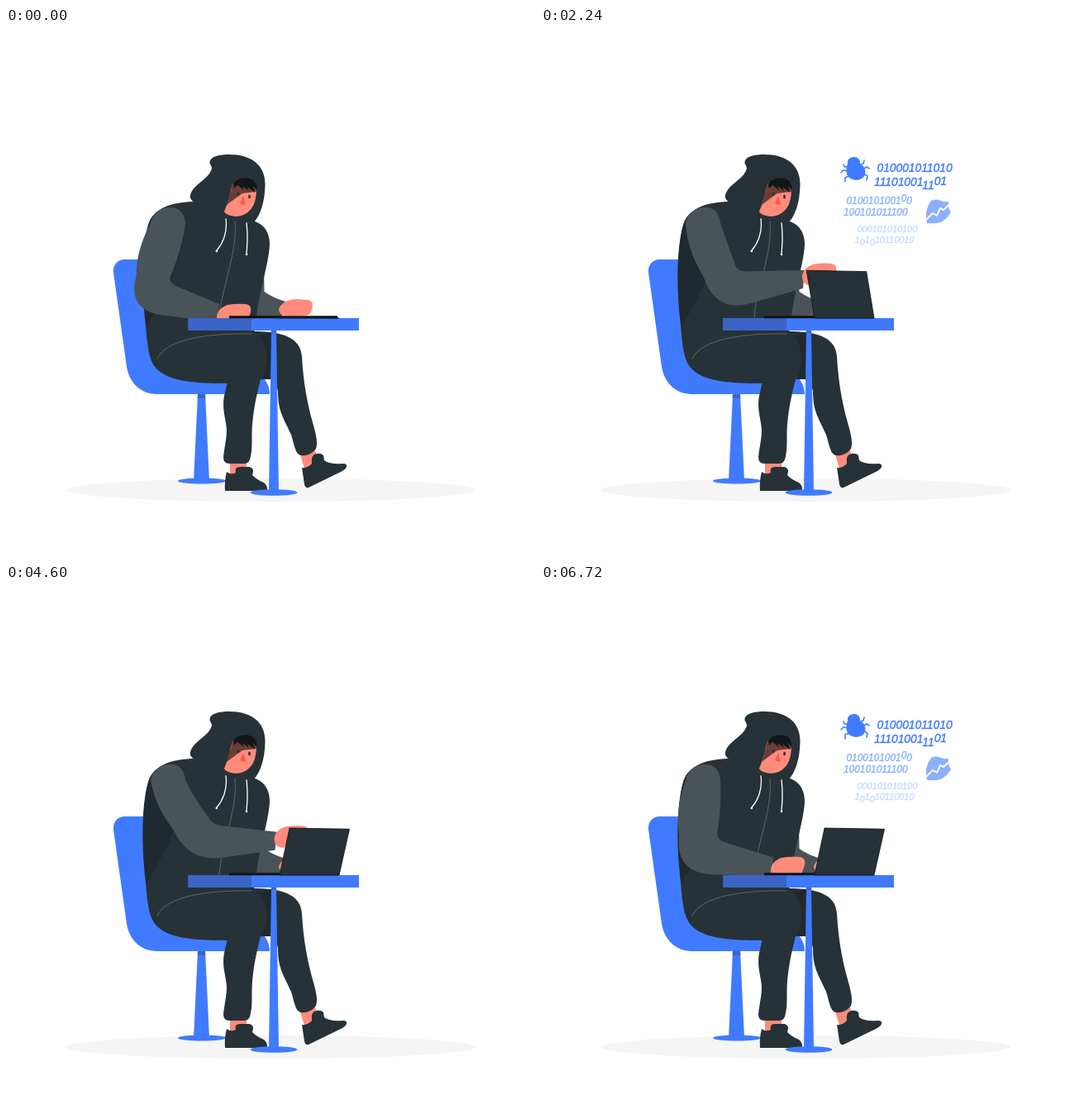
These frames come from a looping animation (640x640 px, 8000 ms). An HTML page:

```html
<!DOCTYPE html>
<html lang="en">
<head>
<meta charset="utf-8">
<title>Hooded figure at a laptop</title>
<style>
  html, body { margin: 0; width: 100%; height: 100%; overflow: hidden; background: #fff; }
  svg { display: block; width: 100%; height: 100%; }
  .dark { fill: #263238; }
  .shade { fill: #1f292f; }
  .sleeve { fill: #4a5357; }
  .blue { fill: #407bff; }
  .deep { fill: #3b64c6; }
  .skin { fill: #ff8b7b; }
  .line { fill: none; stroke-linecap: round; stroke-linejoin: round; }
  #code text { font: italic 13.8px "Liberation Sans", Arial, sans-serif; stroke: #407bff; stroke-width: .4; }
  #code .mid text { font-size: 11.9px; }
  #code .far text { font-size: 10.9px; }
  .mid { opacity: .6; }
  .far { opacity: .28; }
</style>
</head>
<body>
<svg viewBox="0 0 640 640">
  <ellipse cx="320" cy="559" rx="248" ry="14" fill="#f5f5f5"/>

  <g id="chair" class="blue">
    <path d="M144 280H175L190 400H298C310 424 319 428 319 443H183C162 443 149 428 146 410L130 296C129 287 135 280 144 280Z"/>
    <path d="M232 443H241L246 548H227Z"/>
    <path class="deep" d="M232 443H241L241.3 448H231.700Z"/>
    <ellipse cx="237" cy="548" rx="29" ry="3.600"/>
  </g>

  <g id="rearArm">
    <path class="sleeve" d="M312 288L312.500 319Q322 326 338 331L334 350H298Z"/>
    <path class="skin" d="M330 340C334 330 345 328 352 328L366 329C373 331 371 339 369 344Q367 348 360 348H338Q330 347 330 340Z"/>
  </g>

  <g id="legs">
    <path class="skin" d="M356 516L374 511L377 523L361 533ZM271 524H291V541H271Z"/>
    <path class="dark" d="M290 367C330 366 357 372 358 398C360 430 364 450 369 470C374 488 378 500 375 509C370 516 362 518 357 517C350 516 349 505 345 492C336 472 329 464 329 440L326 425H300Z"/>
    <path class="shade" d="M304 373C318 385 317 405 310 425H321V368Z"/>
    <path class="dark" d="M358 532Q364 533 370 527Q369 518 373 516Q380 513 384 517L385 523Q390 528 408 527Q413 527 412 531Q411 534 405 537L366 556Q362 557 361 552Z"/>
    <path class="dark" d="M267 537Q272 541 278 538Q276 531 283 531H295Q301 533 298 541Q304 547 312 550Q316 553 316 558Q316 560 312 560H265Q264 548 267 537Z"/>
  </g>

  <g id="body">
    <path class="dark" d="M226 210C200 211 180 218 173 235C163 265 164 320 169 360C171 385 173 402 181 411C195 427 225 430 268 430L300 370L303 350C306 320 318 285 319 262C319 248 313 237 298 233Z"/>
    <path class="dark" d="M200 385C220 370 270 368 295 368C312 369 316 388 312 406C309 425 303 440 299 470C296 490 299 505 296 518Q295 527 288 527H270Q263 527 263 519C264 508 267 498 267 486C266 472 261 462 264 445L268 428Z"/>
    <path class="shade" d="M173 236C164 265 164 320 170 362L197 312C204 290 216 265 216 236Z"/>
    <path class="line" stroke="#5c676c" d="M183 400C194 376 245 369 297 370"/>
    <path class="line" stroke="#5c676c" d="M277 234C279 255 274 275 268 300C263 320 259 335 258 350"/>
  </g>

  <g id="head">
    <path class="dark" d="M247 160C250 154 262 153 270 153C297 153 314 166 313.500 190C313 211 308 226 300 235L262 232L240 218C230 213 221 208 223 202C227 188 245 184 249 170C249 166 245 165 247 160Z"/>
    <path class="skin" d="M274 189L301 188C304 195 303 205 300 213C296 222 288 228 277 228C270 227 265 225 264 222Q271 205 272 196Z"/>
    <path fill="#6d3c37" d="M274 188L302 190L303 198L286 200L279 205L267 214L272 198Z"/>
    <path fill="#111619" d="M275 189C279 180 296 179 301 186Q304 190 303 196L299 191L301 199L292 192L294 197L286 191L288 196L280 190L276 194Z"/>
    <path fill="#ef5f50" d="M287 203L290 213Q286 215 283 212Z"/>
    <ellipse class="dark" cx="294.500" cy="204" rx="1.400" ry="2.600"/>
    <ellipse class="dark" cx="281" cy="201" rx="1.200" ry="2.200"/>
    <path class="line" stroke="#fff" stroke-width="1.300" d="M266 231C268 246 263 260 255 269M291 236Q293 253 291 273"/>
    <path fill="#fff" d="M253.500 270a1.300 1.300 0 1 0 2.600 0a1.300 1.300 0 1 0-2.600 0M289.700 274a1.300 1.300 0 1 0 2.600 0a1.300 1.300 0 1 0-2.600 0"/>
  </g>

  <path id="sleeve" class="sleeve"/>
  <path id="hand" class="skin" d="M0 15C1 6 8 3 13 1Q24-1 35 0C41 1 42 5 41 10L37 21Q35 25 28 25L12 26Q0 27 0 15Z"/>

  <g id="table" class="blue">
    <path d="M321 366H327L330 560H318Z"/>
    <path class="deep" d="M320.800 366H327.200V369H320.800Z"/>
    <ellipse cx="324" cy="562" rx="28.500" ry="3.800"/>
    <path d="M220.500 351H427V366H220.500Z"/>
    <path class="deep" d="M220.500 351H297V366H220.500Z"/>
  </g>
  <path fill="#0d1214" d="M270 348.300H401V351.300H270Z"/>
  <path id="lid" class="dark" stroke="#0d1214" stroke-width=".8"/>

  <g id="code" class="blue">
    <g>
      <path d="M371 164Q370 157 378 156Q386 156 386 164Q393 168 392.500 176Q390 184 381 184Q370 183 369.500 174Q369 168 371 164Z"/>
      <path class="line" stroke="#407bff" stroke-width="1.600" d="M371 168L367 168L366 165M371 173L366 172L363 175M373 179L368 181V186M387 165L390 164L391 160M391 170L394 168L397 170M391 177L395 179L394 184"/>
      <text x="406.500" y="174">010001011010</text>
      <text x="403" y="191">11101001<tspan dy="4">11</tspan><tspan dy="-5">01</tspan></text>
    </g>
    <g class="mid">
      <text x="369.500" y="213">0100101001<tspan dy="-3">0</tspan><tspan dy="3">0</tspan></text>
      <text x="366" y="227">100101011100</text>
      <path d="M472 209Q478 206 484 209Q489 211 493 210Q492 218 496 223Q492 230 484 235Q476 237 467 236Q463 221 472 209Z"/>
      <path class="line" stroke="#fff" stroke-width="2" d="M467 231L474 224L479 227L483 218L487 220L495 213"/>
    </g>
    <g class="far">
      <text x="382.500" y="247">000101010100</text>
      <text x="379.500" y="260">1<tspan dy="3">0</tspan><tspan dy="-3">1</tspan><tspan dy="3">0</tspan><tspan dy="-3">10110010</tspan></text>
    </g>
  </g>
</svg>

<script>
const LOOP = 8000, END = 6720, BEAT = 1120;
const TICKS = [0, 120, 240, 340, 440, 560, 680, 820, 920, 1020];

// time, inner elbow x y, outer elbow x y, hand x y, lid top offset x y
const POSES = [
  [0,    196, 308, 146, 342, 255, 334, -36, -2],
  [680,  209, 308, 160, 347, 274, 321, -31, -24],
  [1560, 230, 300, 197, 350, 302, 290, -20, -50],
  [2920, 245, 290, 222, 337, 326, 282, 0, -61],
  [4040, 262, 284, 235, 328, 335, 279, 12, -57],
  [5160, 237, 299, 199, 345, 308, 309, 12, -57],
  [6720, 212, 308, 162, 349, 278, 329, 12, -57]
];
const CODE_ON = [[1900, 4260], [6220, LOOP]];

const el = id => document.getElementById(id);
const sleeve = el("sleeve"), hand = el("hand"), lid = el("lid"), code = el("code");

const secant = (i, c) => (POSES[i + 1][c] - POSES[i][c]) / (POSES[i + 1][0] - POSES[i][0]);

function tangent(i, c) {
  if (i === 0) return secant(0, c);
  if (i === POSES.length - 1) return 0;
  const a = secant(i - 1, c), b = secant(i, c);
  return a * b > 0 ? 2 * a * b / (a + b) : 0;
}

// Monotone cubic through the poses
function poseAt(t) {
  let i = 0;
  while (i < POSES.length - 2 && t >= POSES[i + 1][0]) i++;
  const p = POSES[i], q = POSES[i + 1], span = q[0] - p[0], u = (t - p[0]) / span;
  const s = u * u * (3 - 2 * u);
  return p.slice(1).map((v, k) => {
    const c = k + 1;
    return v + (q[c] - v) * s
      + span * u * (1 - u) * ((1 - u) * tangent(i, c) - u * tangent(i + 1, c));
  });
}

const mix = (a, b, k) => [a[0] + (b[0] - a[0]) * k, a[1] + (b[1] - a[1]) * k];

function sleevePath(inner, outer, hx, hy) {
  const top = [hx + 3, hy + Math.max(0, (334 - hy) / 6)];
  const bottom = [hx + 1, top[1] + 22];
  const left = [175, 236], bend = [218 + (inner[0] - 209) * 0.3, 264];
  const back = mix(outer, left, 0.4), mid = mix(back, left, 0.5);
  return `M198 217C210 217 216 224 217 236Q${bend} ${mix(inner, bend, 0.2)}` +
    `Q${inner} ${mix(inner, top, 0.15)}L${top}L${bottom}L${mix(outer, bottom, 0.4)}` +
    `Q${outer} ${back}Q${mid[0] - 9} ${mid[1] + 1} ${left}C178 224 187 217 198 217Z`;
}

function draw(t) {
  const [ix, iy, ox, oy, hx, hy, dx, dy] = poseAt(t);
  sleeve.setAttribute("d", sleevePath([ix, iy], [ox, oy], hx, hy));
  hand.setAttribute("transform", `translate(${hx} ${hy})`);
  lid.setAttribute("d", `M331 351H403L${403.5 + dx} ${352.3 + dy}L${331 + dx} ${351 + dy}Z`);
  code.style.visibility = CODE_ON.some(([a, b]) => t >= a && t < b) ? "visible" : "hidden";
}

// The motion advances in uneven ticks, then rests until the loop ends
function held(t) {
  if (t >= END) return END;
  const phase = t % BEAT;
  return t - phase + TICKS.filter(k => k <= phase).pop();
}

const start = performance.now();
function frame() {
  draw(held((performance.now() - start) % LOOP));
  requestAnimationFrame(frame);
}
frame();
</script>
</body>
</html>
```
